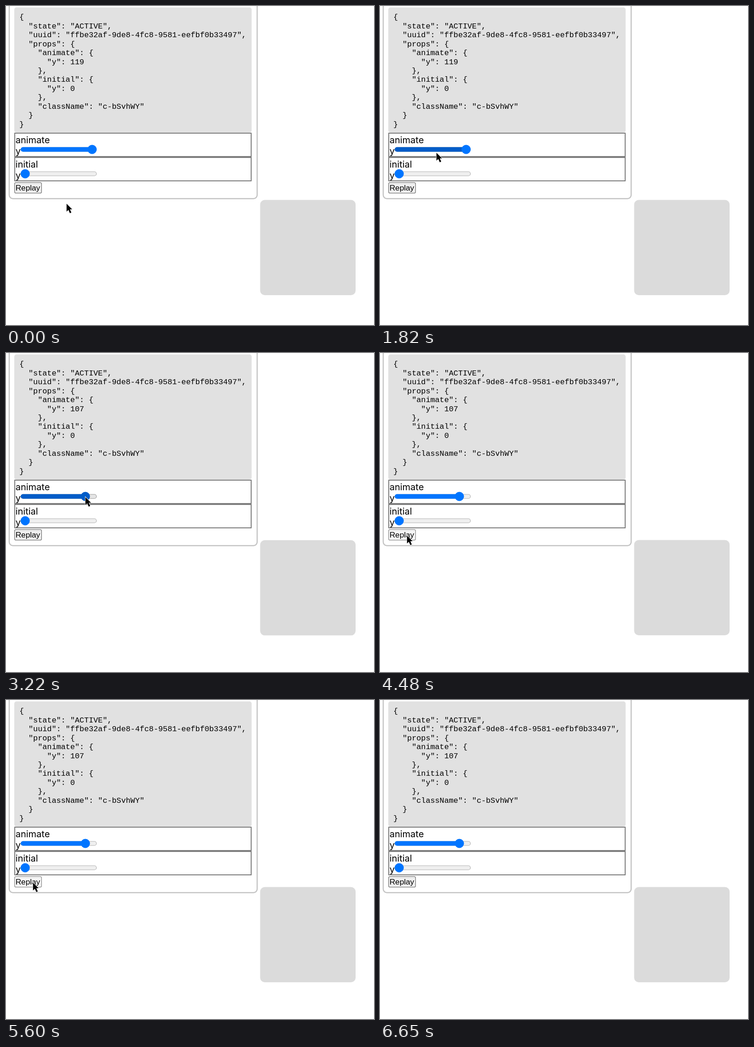
An HTML page for the animation above (6.72 s loop, 800 px wide and 695 px high).

```html
<!DOCTYPE html>
<html lang="en">
<head>
<meta charset="utf-8">
<title>Spring inspector</title>
<style>
  html, body { margin: 0; width: 100%; height: 100%; overflow: hidden; background: #fff; }
  svg { display: block; width: 800px; height: 695px; }
  .code text { font: 16.8px "Liberation Mono", monospace; white-space: pre; }
  .label { font: 20px Inter, sans-serif; }
  .button { font: 17.2px "Liberation Sans", sans-serif; }
</style>
</head>
<body>
<svg id="stage" viewBox="0 0 800 695">
  <rect id="box" x="552.5" width="207.5" height="207.5" rx="10" fill="#dbdbdb"/>
  <rect x="7" y="-30" width="539" height="449.7" rx="8" fill="#fff" stroke="#c4c4c4" stroke-width="2.5"/>
  <rect x="18" y="3" width="516" height="273" rx="5" fill="#e1e1e1"/>
  <g id="code" class="code"></g>
  <g id="fields"></g>
  <g id="replay">
    <rect x="18.7" y="384.7" width="58.6" height="23" rx="3" stroke-width="1.3"/>
    <text class="button" x="20.7" y="402">Replay</text>
  </g>
  <path id="cursor" d="M0 0V17.2L4 13.5L7.2 20.7L10.4 19.3L7.3 12.2H12.2Z"
        stroke="#fff" stroke-width="1.6" paint-order="stroke"/>
</svg>
<script>
const LOOP = 6720, STEP = 70;
const MAX = 119, THUMB_MIN = 41.7, THUMB_MAX = 187.2;
const BOX_TOP = 273.75, SCALE = 1.25;
const STIFFNESS = 500, DAMPING = 25;
const GRAB = 2100, RELEASE = 3360;
const CLICKS = [{ down: 4410, up: 4535 }, { down: 5600, up: 5711 }];
const CURSOR_EXIT = 6510;

// Pointer stops: time, x, y
const STOPS = [
  [0, 131.7, 430.7], [630, 131.7, 430.7], [1260, 112, 460], [1800, 122.7, 319.7],
  [2450, 122.7, 319.7], [3100, 172.6, 314], [3550, 172.6, 314], [4200, 58.7, 397.7],
  [6230, 58.7, 397.7], [6450, 272, 601], [LOOP, 272, 601]
];

const $ = id => document.getElementById(id);
const thumbX = value => THUMB_MIN + (THUMB_MAX - THUMB_MIN) * value / MAX;
const ease = p => p * p * (3 - 2 * p);

function pointerAt(t) {
  const i = STOPS.findIndex(stop => stop[0] > t);
  const [t0, x0, y0] = STOPS[i - 1], [t1, x1, y1] = STOPS[i];
  const p = ease((t - t0) / (t1 - t0));
  return { x: x0 + (x1 - x0) * p, y: y0 + (y1 - y0) * p };
}

function valueAt(t) {
  if (t < GRAB) return MAX;
  const { x } = pointerAt(Math.min(t, RELEASE));
  return Math.round((x - THUMB_MIN) / (THUMB_MAX - THUMB_MIN) * MAX);
}

// Spring towards the slider value, restarted from zero by each click
function springAt(t) {
  const click = CLICKS.filter(c => c.up <= t).pop();
  let y = click ? 0 : MAX, v = 0;
  const dt = 0.001;
  for (let ms = click ? click.up : GRAB; ms < t; ms++) {
    v += (STIFFNESS * (valueAt(ms) - y) - DAMPING * v) * dt;
    y += v * dt;
  }
  return y;
}

const jsonLines = value => JSON.stringify({
  state: "ACTIVE",
  uuid: "ffbe32af-9de8-4fc8-9581-eefbf0b33497",
  props: { animate: { y: value }, initial: { y: 0 }, className: "c-bSvhWY" }
}, null, 2).split("\n");

function field(name, top) {
  const mid = top + 36.5;
  return `<g id="${name}">
    <rect x="18.5" y="${top + .5}" width="515" height="52" fill="#fff" stroke="#858585"/>
    <rect x="19.5" y="${top + 1.5}" width="513" height="50" fill="none" stroke="#707070"/>
    <text class="label" x="20.7" y="${top + 22.6}">${name}</text>
    <text class="label" x="20.7" y="${top + 47.4}">y</text>
    <rect class="track" x="32.6" y="${mid - 4.5}" width="164" height="9" rx="4.5" stroke-width="1.2"/>
    <rect class="fill" x="32" y="${mid - 5}" height="10" rx="5"/>
    <circle class="thumb" cy="${mid}" r="10"/>
  </g>`;
}

function drawSlider(name, value, hover, dragging) {
  const part = cls => document.querySelector(`#${name} .${cls}`);
  const x = thumbX(value), dark = "#005cc8", blue = "#0075ff";
  part("track").setAttribute("fill", hover ? "#e5e5e5" : "#efefef");
  part("track").setAttribute("stroke", hover ? "#9a9a9a" : "#b2b2b2");
  part("fill").setAttribute("width", x - 32);
  part("fill").setAttribute("fill", hover ? dark : blue);
  part("thumb").setAttribute("cx", x);
  part("thumb").setAttribute("fill", dragging ? dark : blue);
}

function drawButton(hover, pressed) {
  const rect = document.querySelector("#replay rect");
  rect.setAttribute("fill", pressed ? "#f5f5f5" : hover ? "#e5e5e5" : "#efefef");
  rect.setAttribute("stroke", pressed ? "#8d8d8d" : hover ? "#4f4f4f" : "#767676");
}

function draw(t) {
  const pointer = pointerAt(t), value = valueAt(t);
  const visible = t < CURSOR_EXIT;
  const over = (x0, y0, x1, y1) => visible &&
    pointer.x > x0 && pointer.x < x1 && pointer.y > y0 && pointer.y < y1;
  const hover = over(32, 302, 198, 323);

  $("box").setAttribute("y", BOX_TOP + springAt(t) * SCALE);
  jsonLines(value).forEach((line, i) => $("code").children[i].textContent = line);
  drawSlider("animate", value, hover, hover && t >= GRAB);
  drawSlider("initial", 0, over(32, 355, 198, 376), false);
  drawButton(over(18, 384, 78, 409), CLICKS.some(c => t >= c.down && t < c.up));
  $("cursor").setAttribute("transform", `translate(${pointer.x} ${pointer.y})`);
  $("cursor").setAttribute("visibility", visible ? "visible" : "hidden");
}

$("code").innerHTML = jsonLines(MAX)
  .map((_, i) => `<text x="28.9" y="${29.3 + i * 19.45}"></text>`).join("");
$("fields").innerHTML = field("animate", 276) + field("initial", 329);

const start = performance.now();
function tick() {
  const t = (performance.now() - start) % LOOP;
  draw(Math.floor(t / STEP) * STEP);
  requestAnimationFrame(tick);
}
tick();
</script>
</body>
</html>
```
